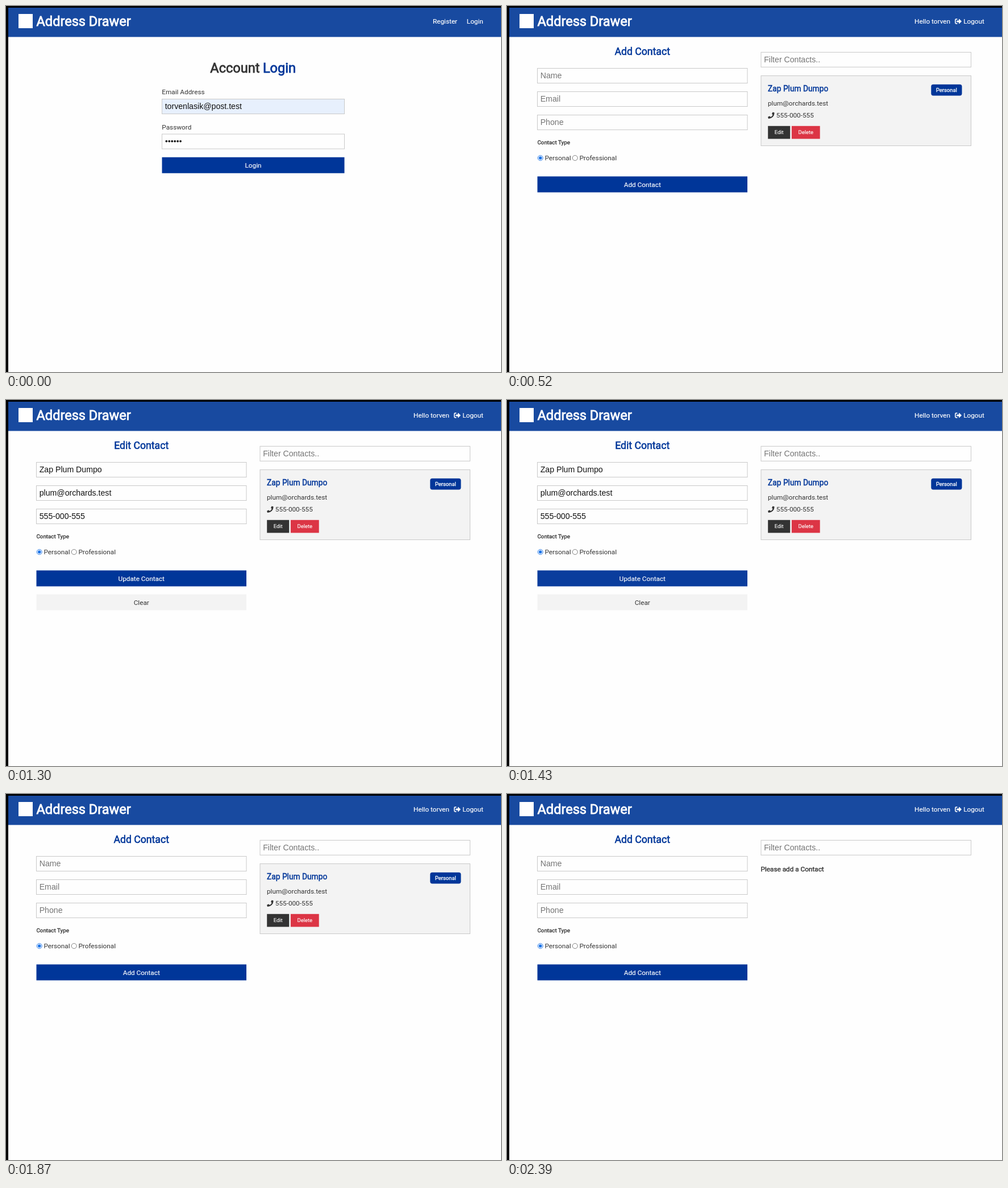
Recreate the animation shown at these times as an HTML page with a canvas. Size 871 by 643 pixels, loop 2.6 s.

```html
<!DOCTYPE html>
<html lang="en">
<head>
<meta charset="utf-8">
<title>Contact manager</title>
<style>
  html, body { margin: 0; width: 100%; height: 100%; overflow: hidden; background: #000; }
  canvas { display: block; }
</style>
</head>
<body>
<canvas id="stage" width="871" height="643"></canvas>
<script>
const ctx = document.getElementById('stage').getContext('2d');

const LOOP = 2600;
const ROBOTO = 'Roboto, sans-serif';
const ARIAL = '"Liberation Sans", Arial, sans-serif';
const REM = 11.78;
const BLUE = '#003699', DARK = '#333', WHITE = '#fff', PAGE = '#fefefe';
const LIGHT = '#f3f3f3', BORDER = '#c9c9c9', HINT = '#757575';

const BRAND = 'Address Drawer';
const USER = { name: 'torven', email: 'torvenlasik@post.test' };
const CONTACT = { name: 'Zap Plum Dumpo', email: 'plum@orchards.test', phone: '555-000-555' };

const PHONE_ICON = new Path2D('M11.5 .6 L9.1 0 Q8.6 0 8.4 .4 L7.3 3 Q7.2 3.4 7.5 3.7 L8.9 4.8 Q7.6 7.5 4.8 8.9 L3.7 7.5 Q3.4 7.2 3 7.3 L.4 8.4 Q0 8.6 0 9.1 L.6 11.5 Q.7 12 1.1 12 A10.9 10.9 0 0 0 12 1.1 Q12 .7 11.5 .6 Z');
const EXIT_ARROW = new Path2D('M3.7 3.5 H7 V1.4 Q7.2 .5 8 1 L11.8 4.7 Q12.1 5 11.8 5.3 L8 9 Q7.2 9.5 7 8.6 V6.5 H3.7 Q3.2 6.5 3.2 6 V4 Q3.2 3.5 3.7 3.5 Z');
const EXIT_DOOR = new Path2D('M4.4 1.1 H2.2 Q.9 1.1 .9 2.4 V7.6 Q.9 8.9 2.2 8.9 H4.4');

// "weight" is the width of an extra outline, in em
function text(str, x, y, { size = REM, color = DARK, font = ROBOTO, align = 'left', weight = 0 } = {}) {
  ctx.font = `${size}px ${font}`;
  ctx.textAlign = align;
  ctx.fillStyle = ctx.strokeStyle = color;
  ctx.fillText(str, x, y);
  if (weight) {
    ctx.lineWidth = size * weight;
    ctx.strokeText(str, x, y);
  }
}

function heading(str, x, y, size, options = {}) {
  text(str, x, y, { size, weight: 0.034, ...options });
}

function rect(x, y, w, h, color) {
  ctx.fillStyle = color;
  ctx.fillRect(x, y, w, h);
}

function frame(x, y, w, h, fill) {
  rect(x, y, w, h, fill);
  ctx.strokeStyle = BORDER;
  ctx.lineWidth = 1;
  ctx.strokeRect(x, y, w, h);
}

function disc(x, y, r, color) {
  ctx.fillStyle = color;
  ctx.beginPath();
  ctx.arc(x, y, r, 0, Math.PI * 2);
  ctx.fill();
}

function icon(x, y, scale, paint) {
  ctx.save();
  ctx.translate(x, y);
  ctx.scale(scale, scale);
  paint();
  ctx.restore();
}

function field(x, y, w, value, color = '#111', fill = PAGE) {
  frame(x, y, w, 26, fill);
  text(value, x + 5.2, y + 17.5, { size: REM * 1.2, font: ARIAL, color });
}

function button(label, x, y, w, { h = 28, fill = BLUE, color = WHITE, size = REM, opacity = 1 } = {}) {
  ctx.globalAlpha = opacity;
  rect(x, y, w, h, fill);
  text(label, x + w / 2, y + h / 2 + size * 0.355, {
    size, color, align: 'center', weight: color === WHITE ? 0.014 : 0
  });
  ctx.globalAlpha = 1;
}

function radio(label, x, y, checked) {
  ctx.strokeStyle = checked ? '#1a73e8' : '#767676';
  ctx.lineWidth = 0.9;
  ctx.beginPath();
  ctx.arc(x, y, 4.5, 0, Math.PI * 2);
  ctx.stroke();
  if (checked) disc(x, y, 2.8, '#1a73e8');
  text(label, x + 7.7, y + 4);
}

function navbar(signedIn) {
  rect(0, 0, 871, 643, '#000');
  rect(4, 3, 867, 640, PAGE);
  rect(4, 3, 867, 51.4, '#184aa0');
  rect(22, 14, 25, 25, WHITE);
  heading(BRAND, 53.5, 35.2, REM * 2, { color: WHITE });

  const link = { color: WHITE, weight: 0.014 };
  if (!signedIn) {
    text('Register', 751, 31.2, link);
    text('Login', 810.8, 31.2, link);
    return;
  }
  text('Hello ' + USER.name, 780, 31.2, { ...link, align: 'right' });
  text('Logout', 803.2, 31.2, link);
  icon(788, 22, 1, () => {
    ctx.fillStyle = ctx.strokeStyle = WHITE;
    ctx.lineWidth = 1.6;
    ctx.fill(EXIT_ARROW);
    ctx.stroke(EXIT_DOOR);
  });
}

function loginPage(buttonOpacity) {
  navbar(false);
  heading('Account ', 359.3, 116.5, REM * 2);
  heading('Login', 510, 116.5, REM * 2, { color: BLUE, align: 'right' });

  text('Email Address', 274.3, 155.2);
  field(274.5, 163.5, 321, USER.email, '#111', '#e7f0fd');
  text('Password', 274.3, 217);
  field(274.5, 225, 321, '');
  for (let i = 0; i < 6; i++) disc(282.3 + i * 4.95, 237.6, 1.85, '#111');

  button('Login', 274.5, 265.7, 321, { opacity: buttonOpacity });
}

function contactForm(editing, buttonOpacity) {
  const action = editing ? 'Edit Contact' : 'Add Contact';
  heading(action, 238.2, 86.4, REM * 1.5, { color: BLUE, align: 'center' });

  const values = editing
    ? [CONTACT.name, CONTACT.email, CONTACT.phone]
    : ['Name', 'Email', 'Phone'];
  values.forEach((value, i) =>
    field(53.5, [109.5, 150.5, 191.5][i], 369.5, value, editing ? '#111' : HINT));

  heading('Contact Type', 53.5, 243.1, REM * 0.83);
  radio('Personal', 58.7, 267, true);
  radio('Professional', 119.7, 267, false);

  button(editing ? 'Update Contact' : 'Add Contact', 53.5, 299.4, 369.5, { opacity: buttonOpacity });
  if (editing) button('Clear', 53.5, 341.4, 369.5, { fill: LIGHT, color: DARK });
}

function contactCard() {
  frame(447, 122.5, 369.5, 123, LIGHT);
  heading(CONTACT.name, 459, 150.4, REM * 1.17, { color: BLUE });

  ctx.fillStyle = BLUE;
  ctx.beginPath();
  ctx.roundRect(746.3, 137.7, 54.2, 19.8, 3.7);
  ctx.fill();
  heading('Personal', 773.4, 151, REM * 0.8, { color: WHITE, align: 'center' });

  text(CONTACT.email, 459, 175.2);
  icon(459.2, 186.6, 0.95, () => {
    ctx.fillStyle = DARK;
    ctx.fill(PHONE_ICON);
  });
  text(CONTACT.phone, 473.8, 196.4);

  const small = { h: 22.6, size: REM * 0.8 };
  button('Edit', 459.2, 210.8, 39, { ...small, fill: DARK });
  button('Delete', 500.9, 210.8, 49.8, { ...small, fill: '#dc3545' });
}

function homePage({ editing = false, empty = false, buttonOpacity = 1 }) {
  navbar(true);
  contactForm(editing, buttonOpacity);
  field(447, 81.3, 369.5, 'Filter Contacts..', HINT);
  if (empty) heading('Please add a Contact', 446.5, 135.5, REM);
  else contactCard();
}

const SCENES = [
  { until: 260, draw: () => loginPage(1) },
  { until: 520, draw: () => loginPage(0.8) },
  { until: 1300, draw: () => homePage({}) },
  { until: 1430, draw: () => homePage({ editing: true }) },
  { until: 1560, draw: () => homePage({ editing: true, buttonOpacity: 0.96 }) },
  { until: 2080, draw: () => homePage({}) },
  { until: LOOP, draw: () => homePage({ empty: true }) }
];

const start = performance.now();
function render() {
  const t = (performance.now() - start) % LOOP;
  SCENES.find(scene => t < scene.until).draw();
  requestAnimationFrame(render);
}
render();
</script>
</body>
</html>
```
